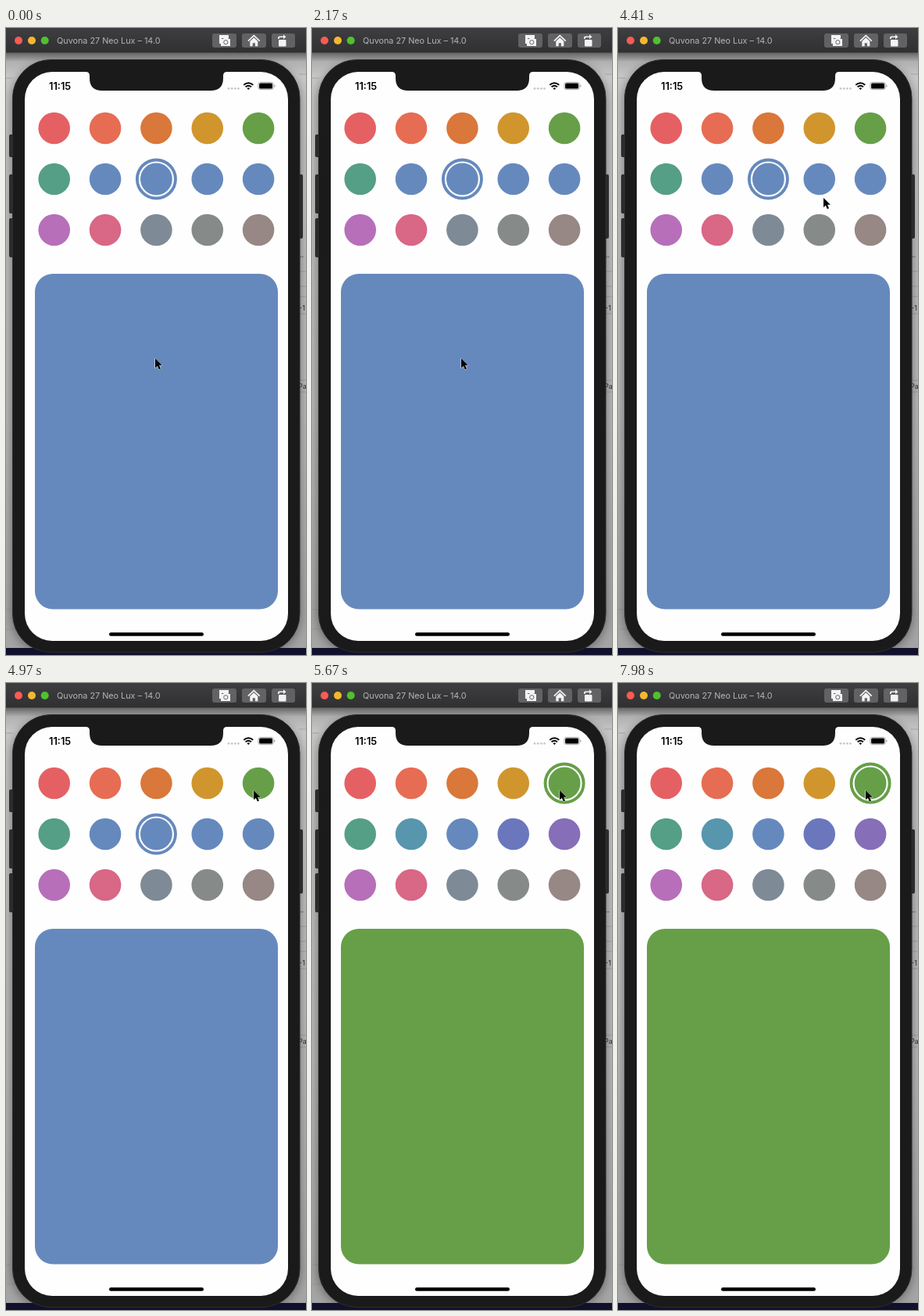
An HTML page that plays this animation: 384 px wide and 801 px high, repeating every 8 s.

```html
<!DOCTYPE html>
<html lang="en">
<head>
<meta charset="utf-8">
<title>Color picker</title>
<style>
html, body { margin: 0; width: 100%; height: 100%; overflow: hidden; background: #b4b4b4; }
svg { display: block; width: 100%; height: 100%; }
text { font-family: Inter, "Liberation Sans", sans-serif; }
</style>
</head>
<body>
<svg viewBox="0 0 384 801">
  <defs>
    <linearGradient id="bar" x2="0" y2="1">
      <stop stop-color="#3e3e40"/><stop offset="1" stop-color="#303032"/>
    </linearGradient>
    <linearGradient id="desk" x2="0" y2="1">
      <stop stop-color="#a2a2a2"/><stop offset=".04" stop-color="#c6c6c6"/>
      <stop offset=".6" stop-color="#bababa"/><stop offset="1" stop-color="#a4a4a4"/>
    </linearGradient>
    <linearGradient id="fade" x2="0" y2="1">
      <stop stop-color="#000" stop-opacity=".4"/><stop offset="1" stop-color="#000" stop-opacity="0"/>
    </linearGradient>
    <filter id="soft" x="-20%" y="-10%" width="140%" height="120%">
      <feGaussianBlur stdDeviation="7"/>
    </filter>
  </defs>

  <!-- desktop behind the device -->
  <rect y="31" width="384" height="761" fill="url(#desk)"/>
  <path d="M0 64H9M0 743H14M0 768H18M375 59H384M375 311H384M375 330H384M375 343H384M375 365H384M375 450H384M375 465H384" stroke="#969696" stroke-width=".7"/>
  <rect x="8" y="46" width="368" height="752" rx="48" opacity=".45" filter="url(#soft)"/>
  <rect y="792" width="384" height="9" fill="#11112d"/>
  <g font-size="9" fill="#292929">
    <text x="376" y="293">..</text>
    <text x="375" y="361">-1</text>
    <text x="374" y="461">Pa</text>
  </g>
  <rect y="31" width="384" height="12" fill="url(#fade)"/>

  <!-- window bar -->
  <rect width="384" height="31.5" fill="url(#bar)"/>
  <circle cx="16" cy="16" r="5" fill="#fc5b54"/>
  <circle cx="33" cy="16" r="5" fill="#f4b72f"/>
  <circle cx="49.7" cy="16" r="5" fill="#4fc12f"/>
  <text x="65" y="20" font-size="10.8" fill="#b5b5b6">Quvona 27 Neo Lux – 14.0</text>
  <g fill="#626264">
    <rect x="264" y="7" width="31" height="18" rx="3"/>
    <rect x="302" y="7" width="31" height="18" rx="3"/>
    <rect x="340" y="7" width="30" height="18" rx="3"/>
  </g>
  <g fill="#f3f3f3">
    <path d="M273 9h12v4h-9v7h-3z"/>
    <path d="M275 14h3l1.5-2h4l1.5 2h2v9h-12z"/>
    <circle cx="281.3" cy="18.2" r="2.6" fill="none" stroke="#626264"/>
    <path d="M317.3 8.5l8 7.5-1.2 1.2-6.8-6.4-6.8 6.4-1.2-1.2z"/>
    <path d="M312.3 17l5-4.7 5 4.7v6.3h-3.4v-4h-3.2v4h-3.4z"/>
    <rect x="349" y="15" width="9.5" height="8.5" rx="1"/>
    <path d="M348 14v-1.5q0-2 2-2h5V8.3l3.5 3-3.5 3V12h-4q-1.5 0-1.5 2z"/>
  </g>

  <!-- device -->
  <g fill="#2c2c2d">
    <rect x="4" y="136" width="7" height="29" rx="2"/>
    <rect x="4" y="187" width="7" height="50" rx="2"/>
    <rect x="4" y="243" width="7" height="50" rx="2"/>
    <rect x="373" y="187" width="7" height="82" rx="2"/>
  </g>
  <rect x="8.5" y="40.5" width="367.5" height="757" rx="49" fill="#1a1a1a" stroke="#2d2d2d"/>
  <rect x="24" y="56" width="337" height="727" rx="35" fill="#fefefe"/>
  <path d="M102 55.5h181v.5q-5 0-5 5v3q0 16-16 16h-139q-16 0-16-16v-3q0-5-5-5z" fill="#1a1a1a"/>

  <!-- status bar -->
  <text x="55" y="79" font-size="12.8" font-weight="600">11:15</text>
  <g fill="#c8c8ca">
    <circle cx="285" cy="77.3" r="1.4"/><circle cx="289.2" cy="77.3" r="1.4"/>
    <circle cx="293.4" cy="77.3" r="1.4"/><circle cx="297.5" cy="77.3" r="1.4"/>
  </g>
  <g fill="none" stroke="#000" stroke-width="1.9">
    <path d="M304.3 72.8q6-5.2 12 0M306.6 75.2q3.7-3.1 7.4 0"/>
  </g>
  <path d="M308.4 77q1.9-1.4 3.8 0l-1.9 2z"/>
  <rect x="322.9" y="69.4" width="19.4" height="9.2" rx="2.6" fill="none" stroke="#9b9b9b" stroke-width=".8"/>
  <rect x="324.1" y="70.6" width="17" height="6.8" rx="1.5"/>
  <path d="M343.3 72.5q1.3.4 1.3 1.5t-1.3 1.5z" fill="#9b9b9b"/>

  <g id="swatches"></g>
  <rect id="card" x="37" y="314" width="311" height="428.5" rx="23"/>
  <rect x="132" y="772.3" width="121" height="4.4" rx="2.2"/>

  <path id="cursor" d="M0 0V12.3L2.8 9.7 4.8 14.3 7 13.4 5 8.8H8.8Z" stroke="#fff" stroke-width="1" stroke-linejoin="round" paint-order="stroke"/>
</svg>
<script>
const LOOP = 8000, STEP = 70, PICK = 5670;
const MOVE = { start: 3773, length: 1000, path: [[191, 421], [215.4, 265.4], [317, 136]] };
const BLUE = 7, GREEN = 4;
const colors = [
  "#e56063", "#e66d54", "#da773a", "#d0962d", "#669f48",
  "#559f86", "#5896ad", "#6689bd", "#6b77bd", "#876eb8",
  "#b76fba", "#d96786", "#7f8a97", "#868b89", "#978885"
];
const mergedBlues = [6, 8, 9];
const byId = id => document.getElementById(id);

function add(parent, tag, attrs) {
  const node = document.createElementNS("http://www.w3.org/2000/svg", tag);
  for (const key in attrs) node.setAttribute(key, attrs[key]);
  return parent.appendChild(node);
}

const swatches = colors.map((color, i) => {
  const cx = 61.7 + i % 5 * 65.35;
  const cy = 128 + Math.floor(i / 5) * 65;
  const group = byId("swatches");
  const disc = add(group, "circle", { cx, cy });
  const ring = add(group, "circle", { cx, cy, r: 21.5, fill: "none", stroke: "#fff", "stroke-width": 2.2 });
  return { disc, ring };
});

function bezier([a, b, c], u) {
  return a.map((v, k) => (1 - u) ** 2 * v + 2 * u * (1 - u) * b[k] + u * u * c[k]);
}

function draw(time) {
  const t = Math.floor(time % LOOP / STEP) * STEP;
  const picked = t < PICK ? BLUE : GREEN;
  swatches.forEach(({ disc, ring }, i) => {
    const merged = picked === BLUE && mergedBlues.includes(i);
    disc.setAttribute("fill", colors[merged ? BLUE : i]);
    disc.setAttribute("r", i === picked ? 26.5 : 20.3);
    ring.setAttribute("visibility", i === picked ? "visible" : "hidden");
  });
  byId("card").setAttribute("fill", colors[picked]);

  const p = Math.min(1, Math.max(0, (t - MOVE.start) / MOVE.length));
  const [x, y] = bezier(MOVE.path, p * p * (3 - 2 * p));
  byId("cursor").setAttribute("transform", `translate(${x} ${y + 1})`);
}

const began = performance.now();
function tick() {
  draw(performance.now() - began);
  requestAnimationFrame(tick);
}
tick();
</script>
</body>
</html>
```
